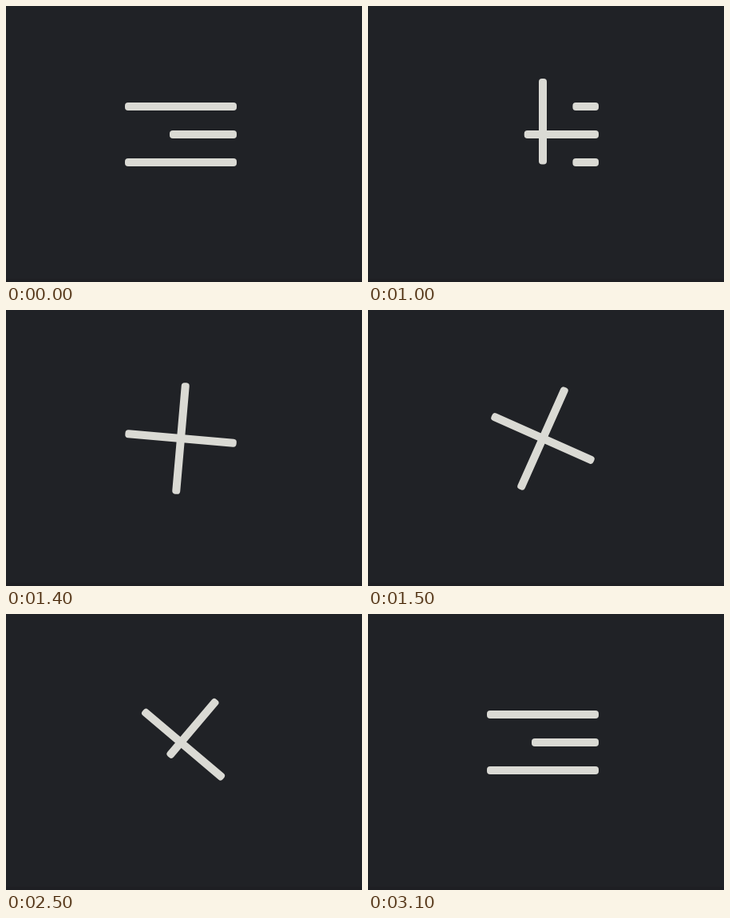
Recreate the animation shown at these times as an HTML page with a canvas. Size 446 by 346 pixels, loop 3500 ms.

```html
<!DOCTYPE html>
<html lang="en">
<head>
<meta charset="utf-8">
<title>Menu icon</title>
<style>
  html, body { margin: 0; width: 100%; height: 100%; overflow: hidden; background: #202226; }
  canvas { display: block; }
</style>
</head>
<body>
<canvas id="stage" width="446" height="346"></canvas>
<script>
const ctx = document.getElementById('stage').getContext('2d');
const LOOP = 3500, STEP = 100;
const HALF = 70, THICK = 10, GAP = 35;

// cubic-bezier(.25, .1, .25, 1)
const bezier = (a, b, u) => 3 * a * u * (1 - u) ** 2 + 3 * b * u * u * (1 - u) + u ** 3;
function ease(x) {
  if (x <= 0) return 0;
  if (x >= 1) return 1;
  let lo = 0, hi = 1;
  for (let i = 0; i < 24; i++) {
    const mid = (lo + hi) / 2;
    if (bezier(0.25, 0.25, mid) < x) lo = mid; else hi = mid;
  }
  return bezier(0.1, 1, lo);
}

// Rises to 1 while opening, falls back to 0 while closing.
const toggle = (t, openAt, openFor, closeAt, closeFor) =>
  ease((t - openAt) / openFor) - ease((t - closeAt) / closeFor);

function bar(x, y, w, h) {
  if (Math.min(w, h) < 0.5) return;
  ctx.beginPath();
  ctx.roundRect(x, y, w, h, Math.min(4, w / 2, h / 2));
  ctx.fill();
}

// Horizontal bar anchored at its right end.
const row = (y, width) => bar(HALF - width, y - THICK / 2, width, THICK);

function draw(t) {
  const outer = 140 * (1 - toggle(t, 930, 150, 2520, 500));
  const middle = 84 + 56 * toggle(t, 930, 500, 2468, 250);
  const upright = 140 * toggle(t, 930, 150, 2472, 130);
  const turn = Math.PI / 4 * toggle(t, 1345, 500, 2468, 300);

  ctx.fillStyle = '#202226';
  ctx.fillRect(0, 0, 446, 346);
  ctx.fillStyle = '#1e1f23';
  ctx.fillRect(0, 342, 446, 4);

  ctx.save();
  ctx.translate(219, 161);
  ctx.rotate(turn);
  ctx.fillStyle = '#dadad4';
  row(-GAP, outer);
  row(0, middle);
  row(GAP, outer);
  bar(-THICK / 2, -HALF, THICK, upright);
  ctx.restore();
}

const start = performance.now();
function tick() {
  const t = (performance.now() - start) % LOOP;
  draw(Math.floor(t / STEP) * STEP);
  requestAnimationFrame(tick);
}
tick();
</script>
</body>
</html>
```
